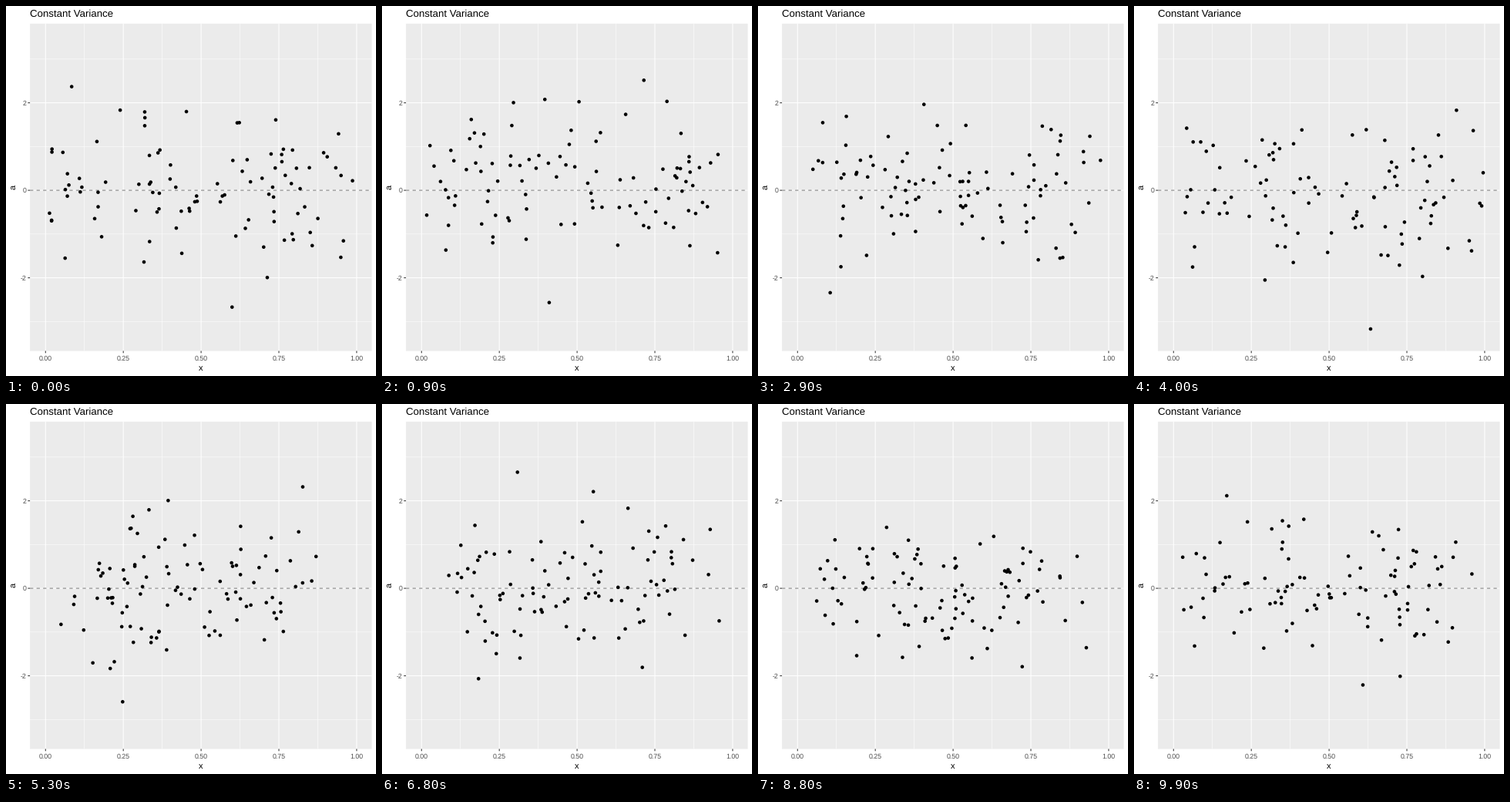
These frames come from a looping animation (480x480 px, 10000 ms). A matplotlib script:

```python
import numpy as np
import matplotlib.pyplot as plt
from matplotlib.animation import FuncAnimation
from matplotlib.patches import Rectangle

SIZE, STATES, COUNT = 480, 10, 100
LEFT, RIGHT, TOP, BOTTOM = 31.1, 474.5, 22.9, 447.5
X0, X_UNIT = 51.3, 403.6
Y0, Y_UNIT = 239.1, 56.75
LINE = 0.5 * 72.27 / 25.4 * 0.75  # half a millimetre-unit stroke, in pixels

# Highest and lowest value of each state.
RANGES = [(2.37, -2.67), (2.70, -2.63), (2.54, -2.30), (2.26, -2.75), (1.83, -3.17),
          (2.98, -3.31), (2.20, -2.30), (3.17, -2.40), (3.46, -3.34), (2.10, -2.50)]

plt.rcParams["font.family"] = "Liberation Sans"
plt.rcParams["path.snap"] = False
plt.rcParams["text.hinting"] = "none"


def px(x):
    return X0 + X_UNIT * x


def py(a):
    return Y0 - Y_UNIT * a


def sample(rng, high, low):
    """Uniform x against standard normal values that span exactly low to high."""
    x = rng.uniform(size=COUNT)
    a = rng.normal(size=4 * COUNT)
    a = a[(a > 0.9 * low) & (a < 0.9 * high)][:COUNT]
    a[a.argmax()], a[a.argmin()] = high, low
    return np.column_stack([px(x), py(a)])


def phase(step):
    """State being left and progress to the next; later states rest one extra step."""
    k, r = divmod(step, 10)
    return k, (r / 10 if k == 0 else max(0, r - 1) / 9)


def line(xs, ys, color, width=LINE, **kw):
    ax.plot(xs, ys, color=color, lw=width, solid_capstyle="butt",
            dash_capstyle="butt", **kw)


def label(x, y, s, size, color="black", ha="center", va="baseline", **kw):
    ax.text(x, y, s, fontsize=size, color=color, ha=ha, va=va, **kw)


fig = plt.figure(figsize=(SIZE / 72, SIZE / 72), dpi=72, facecolor="white")
ax = fig.add_axes([0, 0, 1, 1])
ax.set_xlim(0, SIZE)
ax.set_ylim(SIZE, 0)
ax.axis("off")
ax.add_patch(Rectangle((LEFT, TOP), RIGHT - LEFT, BOTTOM - TOP,
                       fc="#EBEBEB", lw=0, zorder=0))

# Minor grid
for x in np.arange(0.125, 1, 0.25):
    line([px(x)] * 2, [TOP, BOTTOM], "white", LINE / 2)
for a in range(-3, 4, 2):
    line([LEFT, RIGHT], [py(a)] * 2, "white", LINE / 2)

# Major grid, ticks and tick labels
for x in np.linspace(0, 1, 5):
    line([px(x)] * 2, [TOP, BOTTOM], "white")
    line([px(x)] * 2, [BOTTOM, BOTTOM + 2.75], "#333333")
    label(px(x), 460, f"{x:.2f}", 8.8, "#4D4D4D")
for a in (-2, 0, 2):
    line([LEFT, RIGHT], [py(a)] * 2, "white")
    line([LEFT - 2.75, LEFT], [py(a)] * 2, "#333333")
    label(26.5, py(a) + 3.1, str(a), 8.8, "#4D4D4D", ha="right")

line([LEFT, RIGHT], [Y0, Y0], "#7F7F7F", linestyle=(0, (4, 4)))

label(LEFT, 13.4, "Constant Variance", 13.2, ha="left")
label((LEFT + RIGHT) / 2, 473, "x", 11)
label(10.7, (TOP + BOTTOM) / 2, "a", 11, va="center", rotation=90)

rng = np.random.RandomState(11)
states = [sample(rng, *span) for span in RANGES]
dots = ax.scatter(*states[0].T, s=4.6 ** 2, c=["black"] * COUNT,
                  linewidths=0, zorder=5)


def draw(step):
    k, t = phase(step)
    dots.set_offsets((1 - t) * states[k] + t * states[(k + 1) % STATES])
    return [dots]


anim = FuncAnimation(fig, draw, frames=100, interval=100, repeat=True,
                     repeat_delay=0, blit=False)
plt.show()
```
